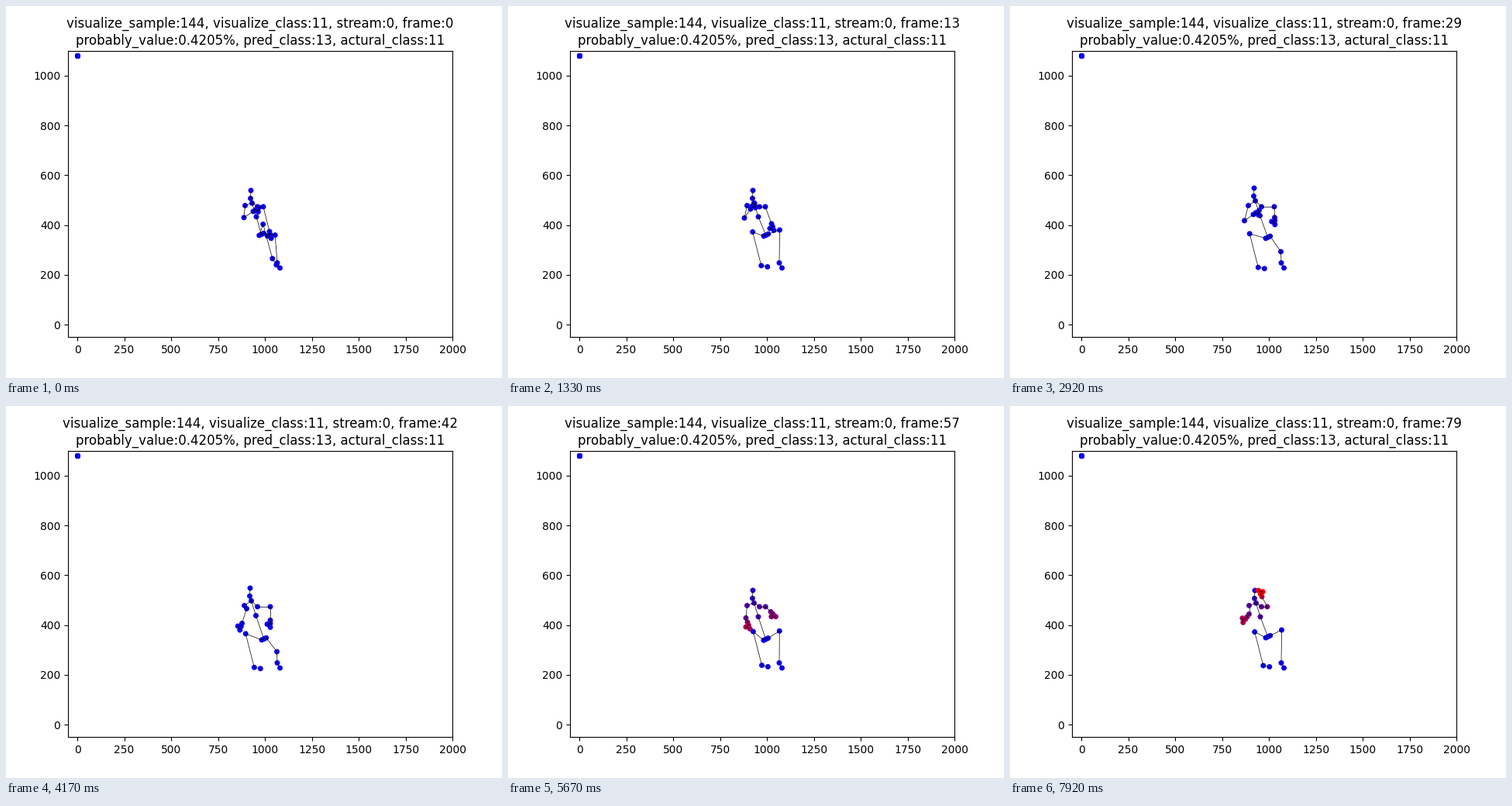
Recreate the animation shown at these times as a matplotlib script. Size 640 px wide and 480 px high, loop 8000 ms.

```python
import numpy as np
import matplotlib.pyplot as plt
from matplotlib.animation import FuncAnimation
from matplotlib.collections import LineCollection

STEP_MS = 20
LOOP_MS = 8000

# Key points in stage pixels: right elbow, right wrist, left wrist.
REACH_AT = [0, 13, 29, 42, 57, 67, 79]
REACH = np.array([
    [307, 273, 319, 265, 340, 291],
    [305, 273.5, 313, 262, 340, 281],
    [302.5, 277, 314, 269, 341.5, 273],
    [310.5, 261.5, 304.5, 280.5, 341, 276.5],
    [307, 273.5, 309, 279, 339, 265.5],
    [312.5, 275.5, 310, 283, 336, 240.5],
    [308.5, 268.5, 306, 272, 325, 246],
])

# Trunk: base, middle, shoulder height, neck, head.
# Arm: shoulder, elbow, wrist, hand, tip, thumb. Leg: hip, knee, ankle, foot.
TRUNK = [(0, 1), (1, 2), (2, 3), (3, 4), (2, 5), (2, 11), (0, 17), (0, 21)]
ARM = [(0, 1), (1, 2), (2, 3), (3, 5), (4, 5)]
LEG = [(0, 1), (1, 2), (2, 3)]
ARM_SHARE = np.array([0.15, 0.3, 0.65, 1, 1, 1])


def shift(pairs, start):
    return [(a + start, b + start) for a, b in pairs]


BONES = (TRUNK + shift(ARM, 5) + shift(ARM, 11)
         + shift(LEG, 17) + shift(LEG, 21))


def vec(x, y):
    return np.array([x, y], float)


def to_data(px):
    x = (px[:, 0] - 80) / 496 * 2050 - 50
    y = 1100 - (px[:, 1] - 57.6) / 369.6 * 1150
    return np.column_stack([x, y])


def arm(shoulder, elbow, wrist, side):
    """The hand carries on along the forearm, the thumb off to one side."""
    d = (wrist - elbow) / np.hypot(*(wrist - elbow))
    thumb = wrist + 5 * d + side * 4 * vec(-d[1], d[0])
    return [shoulder, elbow, wrist, wrist + 4 * d, wrist + 9 * d, thumb]


def joints(n):
    rise = np.clip((22 - abs(n - 35.5)) / 15, 0, 1)   # standing up straight
    turn = max(0, 1.65 * (1 - n / 13), 1 - abs(n - 67) / 11)   # legs crossing
    sway = np.cos(2 * np.pi * n / 104)

    base = vec(332.7 - 2 * turn, 298 - 3.2 * sway)
    up = vec(-1, -3) * rise
    trunk = [base, vec(323, 272) + up / 2]
    trunk += [vec(x, y) + up for x, y in [(317.5, 254.3), (315.5, 248.3),
                                          (316, 238)]]

    r_elbow, r_wrist, l_wrist = np.reshape(
        [np.interp(n, REACH_AT, col) for col in REACH.T], (3, 2))
    left = arm(vec(324.5, 259), vec(332, 259) + vec(9, 0) * rise, l_wrist, 1)
    right = arm(vec(308.5 - rise, 257.5), r_elbow, r_wrist, 1)

    l_leg = [base + vec(3, -1.5),
             vec(350.5, 289) + vec(-1, 28) * rise + vec(-2, 4) * turn,
             vec(350, 331.5), vec(353.5, 338)]
    step = vec(-6.5, 2.3) * rise
    r_leg = [base + vec(-2.7, 1.2),
             vec(315.7, 291.5) + step + vec(9.7, -6) * turn,
             vec(326.8, 335) + step + vec(10.3, -5.5) * turn,
             vec(334.8, 336.5) + step + vec(8.5, -1.5) * turn]
    return to_data(np.array(trunk + left + right + l_leg + r_leg))


def colours(n):
    """Blue at rest, turning red towards the hands later on."""
    warm = np.interp(n, [42, 57], [0, 0.22])
    right = warm * 2.8
    left = warm * np.interp(n, [57, 79], [2.2, 4.2])
    heat = 0.06 + np.concatenate([
        warm * np.array([0, 1, 1, 0.6, 0.4]),
        warm + ARM_SHARE * (left - warm),
        warm + ARM_SHARE * (right - warm),
        np.zeros(8),
    ])
    return np.column_stack([heat, 0 * heat, 1 - heat])


fig, ax = plt.subplots(figsize=(6.4, 4.8), dpi=100)
ax.set_xlim(-50, 2000)
ax.set_ylim(-50, 1100)
ax.set_xticks(range(0, 2001, 250))
ax.set_yticks(range(0, 1001, 200))
title = ax.set_title("")

# The second, absent body rests in the corner.
ax.scatter([0] * 25, [1080] * 25, s=16, color="blue")
dots = ax.scatter([0] * 25, [0] * 25, s=16, color="blue")
bones = ax.add_collection(LineCollection([], colors="black", linewidths=0.5),
                          autolim=False)


def update(i):
    tick = (i * STEP_MS + 14) * 12 // 1000   # 12 ticks a second
    n = (5 * tick + 2) // 6                  # 10 poses a second
    pts = joints(n)
    dots.set_offsets(pts)
    dots.set_color(colours(n))
    bones.set_segments([pts[[a, b]] for a, b in BONES])
    title.set_text(
        f"visualize_sample:144, visualize_class:11, stream:0, frame:{n}\n"
        "probably_value:0.4205%, pred_class:13, actural_class:11")
    return dots, bones, title


anim = FuncAnimation(fig, update, frames=LOOP_MS // STEP_MS,
                     interval=STEP_MS, repeat=True, repeat_delay=0)
plt.show()
```
